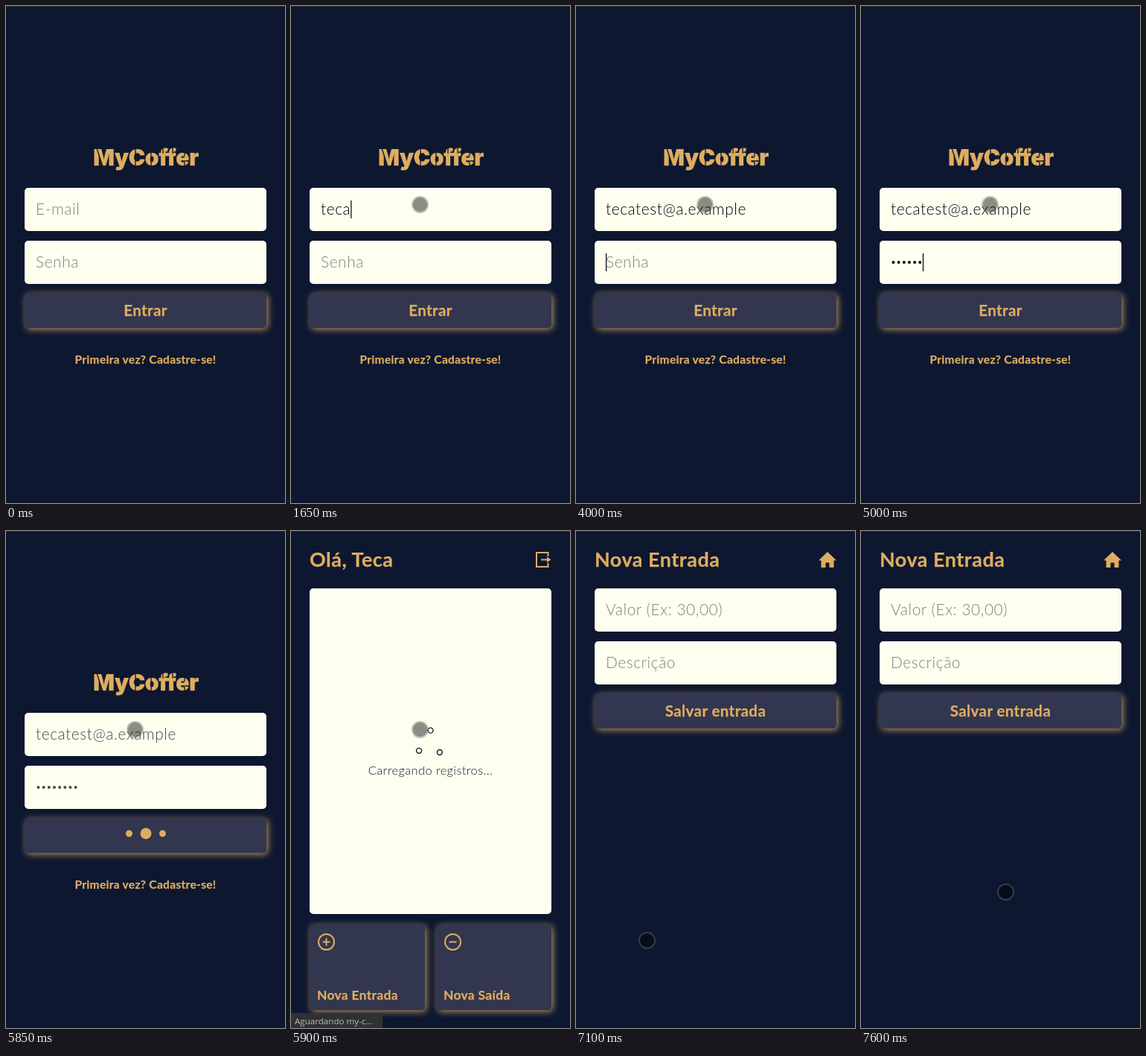
An HTML page that plays this animation: 375x667 px, repeating every 8 s.

```html
<!DOCTYPE html>
<html lang="pt-BR">
<head>
<meta charset="utf-8">
<title>MyCoffer</title>
<style>
html, body { margin: 0; width: 100%; height: 100%; overflow: hidden; background: #0d1730; }
svg { display: block; width: 100%; height: 100%; }
text { font: 300 20.9px Lato, sans-serif; letter-spacing: .027em; }
.mid { text-anchor: middle; }
.gold { fill: #dfad5f; }
text.gold { font-size: 20.5px; font-weight: 700; letter-spacing: .02em; stroke: #dfad5f; stroke-width: .25; }
text.brand { font: 900 30px Inter, sans-serif; letter-spacing: -.01em; }
text.head { font-size: 26.9px; }
text.label { font-size: 17.4px; }
text.link { font-size: 15.5px; }
.hint { fill: #80807a; }
.empty { fill: #6c6c6c; }
.wait { font-size: 16.4px; fill: #0d1730; letter-spacing: .025em; }
.tip { font: 400 11.6px "Open Sans", sans-serif; fill: #bdbdbd; letter-spacing: 0; }
.paper { fill: #fffff0; }
.btn { fill: #32364f; filter: drop-shadow(2px 2px 5px rgba(223, 173, 95, .8)); }
.line { fill: none; stroke: #dfad5f; stroke-width: 2; }
</style>
</head>
<body>
<svg viewBox="0 0 375 667">
  <rect width="375" height="667" fill="#0d1730"/>
  <rect width="375" height="1" fill="#26282d"/>

  <g id="login">
    <text class="gold brand mid" x="188" y="214">MyCoffer</text>
    <path d="M122 191l8 24M174 190v26M195 196v20M211 190v8M224 190v8M240 196v6M240 209v7" fill="none" stroke="#0d1730" stroke-width="1.3"/>
    <rect class="paper" x="25" y="244" width="325" height="58" rx="5"/>
    <rect class="paper" x="25" y="315" width="325" height="58" rx="5"/>
    <text id="mailHint" class="hint" x="40" y="280">E-mail</text>
    <text id="mail" x="40" y="280"></text>
    <text id="passHint" class="hint" x="40" y="351">Senha</text>
    <g id="pass"></g>
    <rect id="caret" width="1.2" height="24"/>
    <rect class="btn" x="25" y="385" width="325" height="47" rx="5"/>
    <text id="enter" class="gold mid" x="187.5" y="416">Entrar</text>
    <g id="dots" fill="#dfad5f"></g>
    <text class="gold link mid" x="187.5" y="480">Primeira vez? Cadastre-se!</text>
  </g>

  <g id="home">
    <text class="gold head" x="25" y="48">Olá, Teca</text>
    <path class="line" d="M345.5 34V29H330V48H345.5V43M336 38.5H345"/>
    <path class="gold" d="M344 34.5L349.5 38.5L344 42.5Z"/>
    <rect class="paper" x="25" y="77" width="325" height="437" rx="5"/>
    <g id="loading">
      <g id="balls" fill="none" stroke="#0d1730" stroke-width="1.4"></g>
      <text class="wait mid" x="187.5" y="327">Carregando registros...</text>
    </g>
    <g id="empty">
      <text class="empty mid" x="187.5" y="298">Não há registros de entrada ou</text>
      <text class="empty mid" x="187.5" y="318">saída</text>
    </g>
    <rect class="btn" x="25" y="528" width="155" height="115" rx="5"/>
    <rect class="btn" x="195" y="528" width="155" height="115" rx="5"/>
    <path class="line" d="M42.5 551.5h10M47.5 546.5v10M212.5 551.5h10"/>
    <circle class="line" cx="47.5" cy="551.5" r="10.5"/>
    <circle class="line" cx="217.5" cy="551.5" r="10.5"/>
    <text class="gold label" x="35" y="629">Nova Entrada</text>
    <text class="gold label" x="205" y="629">Nova Saída</text>
    <g id="status">
      <path d="M0 647H119Q123 647 123 651V667H0Z" fill="#303135"/>
      <text class="tip" x="5" y="662">Aguardando my-c...</text>
    </g>
  </g>

  <g id="entry">
    <text class="gold head" x="25" y="48">Nova Entrada</text>
    <path class="gold" d="M338 28L350 39.5H346.5V49H340.5V42.5H335.5V49H329.5V39.5H326Z"/>
    <rect class="paper" x="25" y="77" width="325" height="58" rx="5"/>
    <rect class="paper" x="25" y="148" width="325" height="58" rx="5"/>
    <text class="hint" x="40" y="113">Valor (Ex: 30,00)</text>
    <text class="hint" x="40" y="184">Descrição</text>
    <rect class="btn" x="25" y="218" width="325" height="47" rx="5"/>
    <text class="gold mid" x="187.5" y="249">Salvar entrada</text>
  </g>

  <g id="pointer">
    <circle r="9.7" fill="#000" fill-opacity=".45"/>
    <circle r="10.5" fill="none" stroke="#6e6e6e" stroke-opacity=".42" stroke-width="2"/>
  </g>
</svg>
<script>
const LOOP = 8000, STEP = 50;
const MAIL = "tecatest@a.example";
// Moment at which each character is typed
const mailKeys = [1350, 1450, 1550, 1650, 1800, 1900, 1900, 2050, 2300, 2750, 2850, 3000, 3150, 3400, 3500, 3600, 3700, 3900];
const passKeys = [4550, 4650, 4800, 4850, 4950, 5000, 5150, 5300];
const caretOn = [[600, 1000], [1350, 4400], [4550, 5450]];
const SUBMIT = 5450, HOME = 5900, LOADED = 6250, ENTRY = 7100;
// Pointer stops: time, x, y
const stops = [[50, 22, -20], [450, 173.5, 266.5], [6600, 173.5, 266.5], [6900, 95.5, 549.5], [7100, 95.5, 549.5], [7600, 194.5, 484.5], [LOOP, 194.5, 484.5]];

const $ = id => document.getElementById(id);
const show = (id, on) => $(id).style.display = on ? "" : "none";
const set = (el, attrs) => { for (const k in attrs) el.setAttribute(k, attrs[k]); };
const mix = (a, b, p) => a + (b - a) * p;
const typed = (keys, t) => keys.filter(k => k <= t).length;

function circles(id, n, attrs) {
  return Array.from({ length: n }, (_, i) => {
    const c = document.createElementNS("http://www.w3.org/2000/svg", "circle");
    set(c, attrs(i));
    $(id).append(c);
    return c;
  });
}
const bullets = circles("pass", 8, i => ({ cx: 43.5 + 7.15 * i, cy: 344, r: 2 }));
const dots = circles("dots", 3, i => ({ cx: 165.5 + 22.5 * i, cy: 406 }));
const balls = circles("balls", 3, () => ({ r: 3.5 }));

function drawLogin(t) {
  const n = typed(mailKeys, t), m = typed(passKeys, t), sent = t >= SUBMIT;
  const ink = { fill: sent ? "#484848" : "#000" };
  $("mail").textContent = MAIL.slice(0, n);
  set($("mail"), ink);
  set($("pass"), ink);
  bullets.forEach((b, i) => b.style.display = i < m ? "" : "none");
  show("mailHint", !n);
  show("passHint", !m);
  show("enter", !sent);
  show("dots", sent);

  show("caret", caretOn.some(([a, b]) => t >= a && t < b));
  const inPass = t >= 4000;
  set($("caret"), {
    x: 40 + (inPass ? 7.15 * m : n && $("mail").getComputedTextLength()),
    y: inPass ? 332 : 261
  });

  const wave = Math.abs(1 - ((t - SUBMIT + LOOP) % 800) / 400);
  dots.forEach((d, i) => set(d, { r: mix(4.5, 7.5, i === 1 ? 1 - wave : wave) }));
}

function drawHome(t) {
  show("loading", t < LOADED);
  show("empty", t >= LOADED);
  $("status").style.opacity = Math.max(0, Math.min(1, (6350 - t) / 100));
  // Three balls chase each other around a triangle
  const corners = [[171, 297], [186.5, 265.5], [202, 297]];
  const turn = (t - HOME + STEP) / 2200 * 3;
  balls.forEach((b, i) => {
    const k = i + Math.floor(turn), p = turn % 1;
    const from = corners[k % 3], to = corners[(k + 1) % 3];
    set(b, { cx: mix(from[0], to[0], p), cy: mix(from[1], to[1], p) });
  });
}

function drawPointer(t) {
  const i = Math.max(1, stops.findIndex(s => s[0] > t));
  const a = stops[i - 1], b = stops[i];
  const p = (t - a[0]) / (b[0] - a[0]);
  set($("pointer"), { transform: `translate(${mix(a[1], b[1], p)} ${mix(a[2], b[2], p)})` });
  show("pointer", t >= 100);
}

function frame(now) {
  const t = Math.floor(now % LOOP / STEP) * STEP;
  show("login", t < HOME);
  show("home", t >= HOME && t < ENTRY);
  show("entry", t >= ENTRY);
  if (t < HOME) drawLogin(t);
  else if (t < ENTRY) drawHome(t);
  drawPointer(t);
  requestAnimationFrame(frame);
}
requestAnimationFrame(frame);
</script>
</body>
</html>
```
